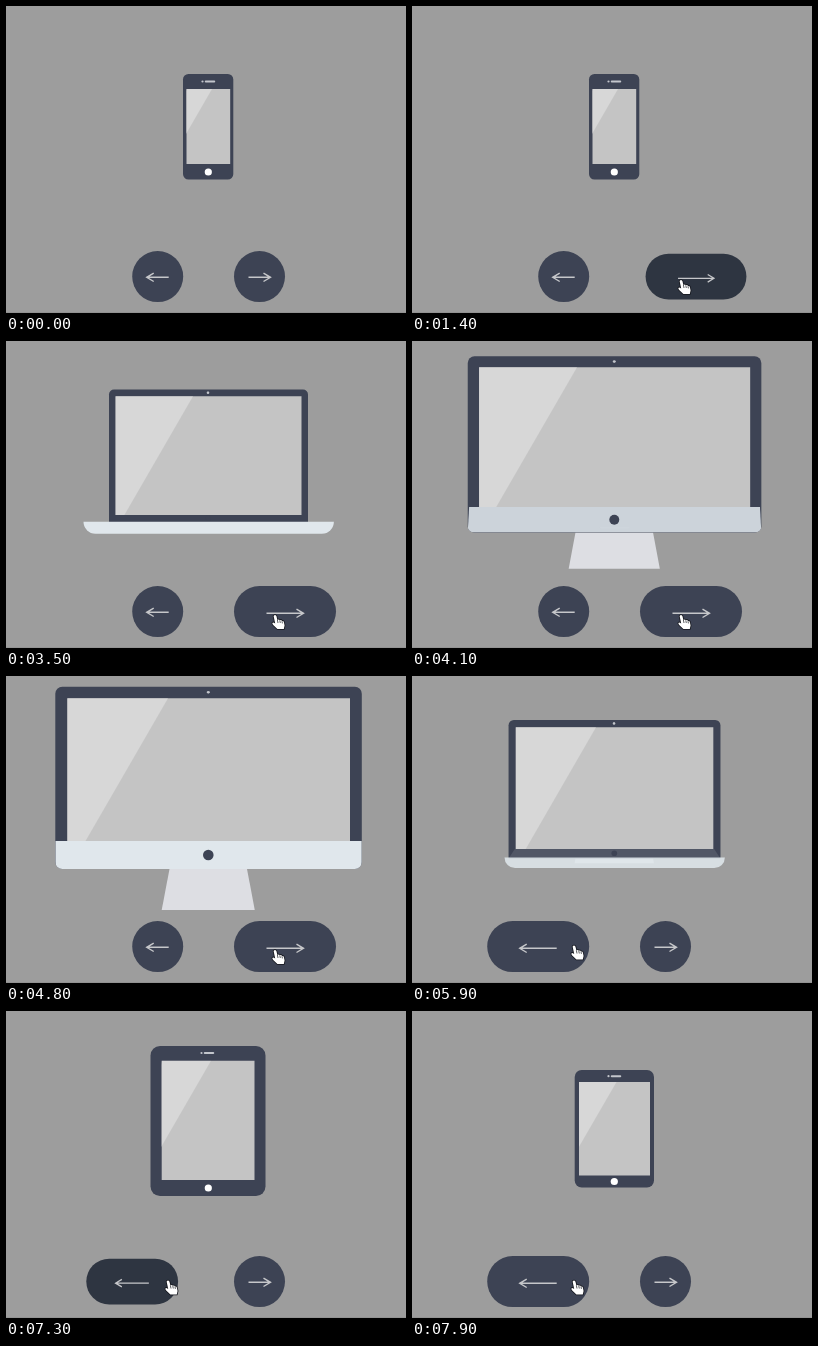
Write an HTML page with a canvas that moves like this. It is 400 px wide and 307 px high and loops after 8000 ms.

```html
<!DOCTYPE html>
<html lang="en">
<head>
<meta charset="utf-8">
<title>Device morph</title>
<style>
html, body { margin: 0; height: 100%; overflow: hidden; background: #9d9d9d; }
canvas { display: block; }
</style>
</head>
<body>
<canvas id="stage" width="400" height="307"></canvas>
<script>
const ctx = document.getElementById('stage').getContext('2d');
const LOOP = 8000;
const DARK = [61, 67, 84], PRESSED = [46, 53, 65], PALE = [224, 231, 236], WHITE = [255, 255, 255];

// body and screen are [left, top, right, bottom]; radius is [top, bottom];
// home is [y, radius, whiteness]; lens is [dot x, bar x, y, bar width]
const DEVICES = [
  { body: [177, 68, 227.3, 173.5], screen: [180.5, 83, 224.2, 158], shine: [206], radius: [5.5, 5.5],
    home: [166, 3.6, 1], lens: [196.5, 204, 75.5, 10.5], chin: [0], base: [0], foot: [160] },
  { body: [162.7, 59, 242, 176.5], screen: [167, 71, 238, 164.5], shine: [204.5], radius: [7, 7],
    home: [170.5, 3.6, 1], lens: [196.5, 204, 65.2, 10.5], chin: [0], base: [0], foot: [165] },
  { body: [144.5, 35, 259.5, 185], screen: [155.7, 49.7, 248.5, 169], shine: [205], radius: [9.5, 9.5],
    home: [177, 3.6, 1], lens: [195.5, 203, 42, 10.5], chin: [0], base: [0], foot: [170] },
  { body: [103, 48.5, 302, 181], screen: [109.5, 55.3, 295.5, 174], shine: [187], radius: [5, 0],
    home: [177, 2.5, 0], lens: [202, 202, 51.7, 2.6], chin: [0], base: [1], foot: [181] },
  { body: [49.3, 10.7, 355.8, 193], screen: [61.3, 22.3, 344, 165], shine: [162], radius: [7, 7],
    home: [179, 5.3, 0], lens: [202.3, 202.3, 16.3, 3.2], chin: [1], base: [0], foot: [234] }
];
const CLICKS = [[1400, 1], [2200, 2], [3000, 3], [3900, 4], [5700, 3], [6600, 2], [7300, 1]];

const lerp = (a, b, k) => a + (b - a) * k;
const clamp = v => Math.max(0, Math.min(1, v));
const smooth = v => { v = clamp(v); return v * v * (3 - 2 * v); };
const mix = (a, b, k) => `rgb(${a.map((v, i) => Math.round(lerp(v, b[i], clamp(k))))})`;

// damped swing from 0 to 1, at rest after 400 ms
function spring(ms) {
  if (ms <= 0) return 0;
  if (ms >= 400) return 1;
  const s = ms / 1000, p = ms / 400;
  return 1 - (1 - p * p) * Math.exp(-7 * s) * (Math.cos(17 * s) + 0.41 * Math.sin(17 * s));
}

function poly(points, fill) {
  ctx.beginPath();
  points.forEach(([x, y]) => ctx.lineTo(x, y));
  ctx.closePath();
  ctx.fillStyle = fill;
  ctx.fill();
}

function roundBox(l, t, r, b, radii, fill) {
  ctx.beginPath();
  ctx.roundRect(l, t, Math.max(0, r - l), Math.max(0, b - t), radii);
  ctx.fillStyle = fill;
  ctx.fill();
}

function disc(x, y, r, fill) {
  ctx.beginPath();
  ctx.arc(x, y, Math.max(0, r), 0, 7);
  ctx.fillStyle = fill;
  ctx.fill();
}

function deviceAt(t) {
  let from = DEVICES[0], to = from, k = 1;
  for (const [at, id] of CLICKS) {
    if (t < at + 100) break;
    from = to;
    to = DEVICES[id];
    k = spring(t - at - 100);
  }
  const d = {};
  for (const key in to) d[key] = to[key].map((v, i) => lerp(from[key][i], v, k));
  return d;
}

function drawDevice(d) {
  const [l, t, r, b] = d.body, [sl, st, sr, sb] = d.screen;
  const chin = clamp(d.chin[0]), foot = d.foot[0];
  const rt = Math.max(0, d.radius[0]), rb = Math.max(0, d.radius[1]);

  if (foot > b) {
    const flare = (foot - b) * 0.19;
    poly([[163.5, b], [241, b], [241 + flare, foot], [163.5 - flare, foot]], '#dddee3');
  }
  roundBox(l, t, r, b, [rt, rt, rb, rb], mix(DARK, DARK, 0));

  if (chin > 0) {
    ctx.save();
    ctx.clip();
    const inset = (sl - l) * (1 - chin);
    poly([[l + inset, sb], [r - inset, sb], [r, b], [l, b]], mix(DARK, PALE, chin));
    ctx.restore();
  }

  roundBox(sl, st, sr, sb, 0, '#c4c4c4');
  ctx.save();
  ctx.clip();
  const x = d.shine[0], h = sb - st;
  poly([[sl, st], [x, st], [x - h / 1.73, sb], [Math.min(sl, x - h / 1.73), sb]], '#d7d7d7');
  ctx.restore();

  const [dot, bar, y, w] = d.lens;
  disc(dot, y, 1.1, '#c3c6cc');
  roundBox(bar - w / 2, y - 1, bar + w / 2, y + 1, 1, '#c3c6cc');
  disc(202.3, d.home[0], d.home[1], mix(DARK, WHITE, d.home[2]));

  const base = d.base[0];
  if (base > 0) {
    ctx.save();
    ctx.globalAlpha = Math.min(1, base);
    ctx.translate(202.7, 186.7);
    ctx.scale(base, Math.min(1, base));
    roundBox(-125.2, -6, 125.2, 6, [0, 0, 12, 12], '#e0e7ec');
    ctx.restore();
  }
}

// dir is -1 for the left button, 1 for the right; open runs from 0 to 1
function drawButton(dir, open, pressed) {
  const inner = dir < 0 ? 177.2 : 228;
  const w = 51 + 51 * open, half = (22 + 15 * open) / 2, s = pressed ? 0.9 : 1;
  ctx.save();
  ctx.translate(inner + dir * w / 2, 270.6);
  ctx.scale(s * dir, s);
  roundBox(-w / 2, -25.5, w / 2, 25.5, 25.5, mix(DARK, PRESSED, pressed ? 1 : 0));
  ctx.translate(0, 0.7 + open);
  ctx.beginPath();
  ctx.moveTo(-half, 0);
  ctx.lineTo(half, 0);
  ctx.moveTo(half - 7, -4.2);
  ctx.lineTo(half, 0);
  ctx.lineTo(half - 7, 4.2);
  ctx.lineWidth = 1.4;
  ctx.strokeStyle = '#c6c7ca';
  ctx.stroke();
  ctx.restore();
}

function drawCursor(x, y, hand) {
  const shape = hand
    ? 'M-1.4 1Q0-1 1.4 1L2.4 5Q4 3.8 4.8 5.2Q6.4 4.4 7 6Q8.8 5.6 9 7.4L9.6 10.5L8.8 14H2.4L-1.8 10Q-3.6 7.6-1.6 7.4L.2 8.6Z'
    : 'M0 0V13L3 10.2L5 15L7 14.2L5 9.5H9Z';
  const path = new Path2D(shape);
  ctx.save();
  ctx.translate(x, y);
  ctx.lineWidth = 1.6;
  ctx.lineJoin = 'round';
  ctx.strokeStyle = '#14161c';
  ctx.stroke(path);
  ctx.fillStyle = '#fff';
  ctx.fill(path);
  if (hand) {
    ctx.lineWidth = 0.7;
    ctx.stroke(new Path2D('M2.4 5L3 8M4.8 5.4L5.3 8M7 6.2L7.4 8.4'));
  }
  ctx.restore();
}

function draw(t) {
  ctx.fillStyle = '#9d9d9d';
  ctx.fillRect(0, 0, 400, 307);
  ctx.fillStyle = '#929292';
  ctx.fillRect(0, 306, 400, 1);

  drawDevice(deviceAt(t));

  const down = CLICKS.some(([at]) => t >= at && t < at + 110);
  const rightOpen = spring(t - 1200) - spring(t - 5050);
  const leftOpen = spring(t - 5250);
  drawButton(-1, leftOpen, down && t > 5250);
  drawButton(1, rightOpen, down && t < 5050);

  if (t >= 900) {
    const enter = smooth((t - 850) / 450), cross = smooth((t - 4800) / 600);
    const x = lerp(385, 269, enter) - 107 * cross;
    const y = lerp(305, 274, enter) - 4.5 * cross;
    drawCursor(x, y, (t >= 1200 && t < 5050) || t >= 5250);
  }
}

function frame() {
  draw(performance.now() % LOOP);
  requestAnimationFrame(frame);
}
frame();
</script>
</body>
</html>
```
